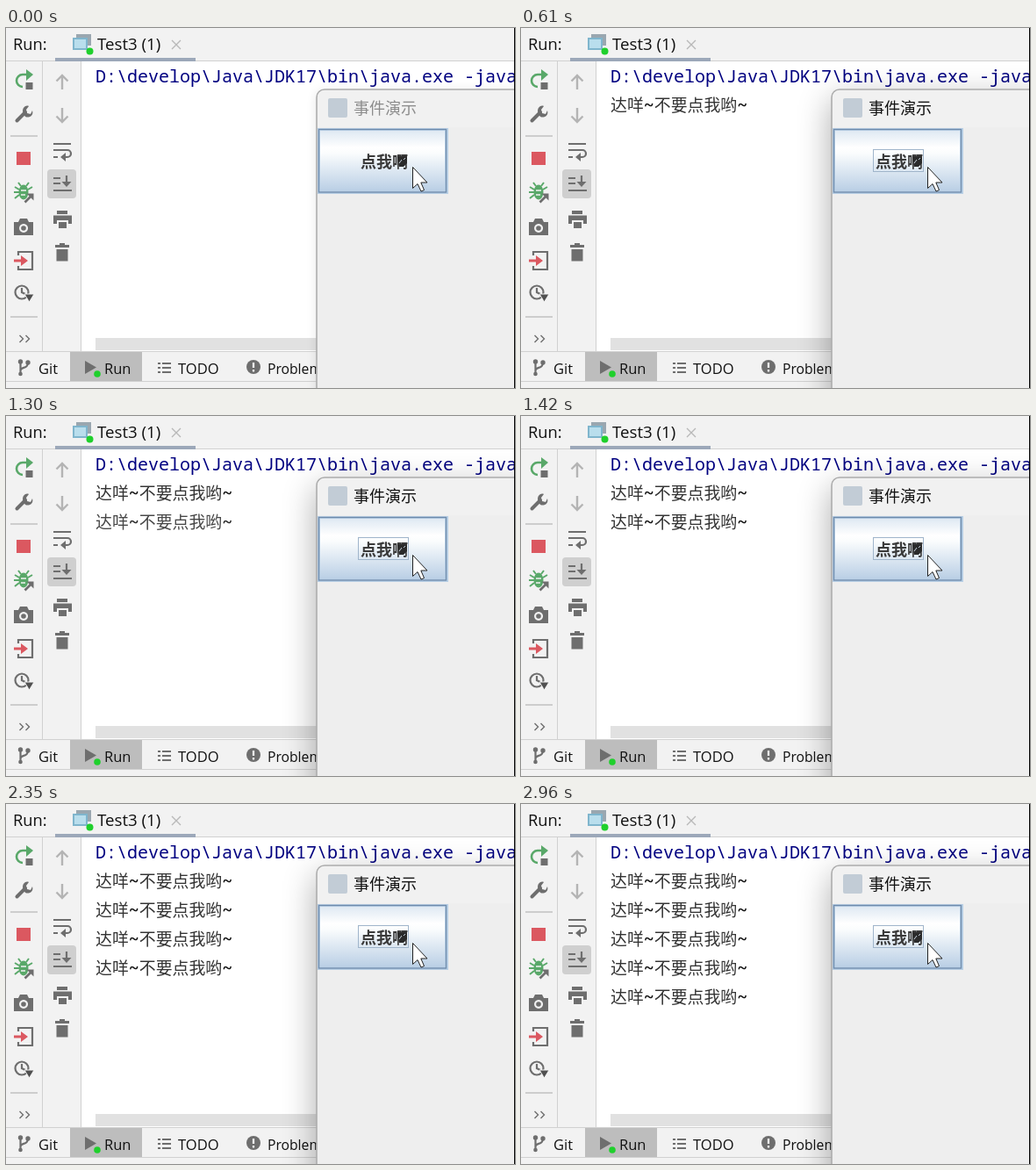
These frames come from a looping animation (580 px wide and 410 px high, 3 s). An HTML page:

```html
<!DOCTYPE html>
<html lang="zh-CN">
<head>
<meta charset="utf-8">
<title>Button event demo</title>
<style>
  html, body { margin: 0; width: 100%; height: 100%; overflow: hidden; background: #f2f2f2; }
  svg { display: block; }
  text { white-space: pre; }
  .ui { font-family: "Open Sans", "Noto Sans", sans-serif; fill: #111; }
  .mono { font-family: "Noto Sans Mono", "DejaVu Sans Mono", monospace; font-size: 20px; }
  .tilde { font-weight: 700; fill: #111; }
  .cjk { font-family: "Noto Sans CJK SC", "Noto Sans CJK", sans-serif; }
  .line { fill: none; stroke: #6e6e6e; stroke-width: 2.2; }
  .thin { stroke-width: 1.4; }
  .gray { fill: #6e6e6e; }
  .green { fill: #59a869; }
  .rule { fill: none; stroke: #d1d1d1; }
</style>
</head>
<body>
<svg width="580" height="410" viewBox="0 0 580 410">
  <defs>
    <linearGradient id="metal" x2="0" y2="1">
      <stop offset="0" stop-color="#dfe9f3"/>
      <stop offset=".28" stop-color="#fff"/>
      <stop offset=".38" stop-color="#fafcfd"/>
      <stop offset="1" stop-color="#bacfe5"/>
    </linearGradient>
    <filter id="soft" x="-40%" y="-40%" width="180%" height="180%"><feGaussianBlur stdDeviation="7"/></filter>
    <filter id="wide" x="-40%" y="-40%" width="180%" height="180%"><feGaussianBlur stdDeviation="19"/></filter>
  </defs>

  <!-- IDE panels -->
  <rect width="580" height="410" fill="#f2f2f2"/>
  <rect x="86" y="38" width="494" height="330" fill="#fff"/>
  <rect x="102" y="353" width="478" height="14" fill="#e1e1e1"/>
  <rect x="73" y="369" width="82" height="33" fill="#bdbdbd"/>
  <path class="rule" d="M0 37.5H580M0 368.5H580M0 402.5H580M41.5 38V368M85.5 38V368"/>
  <path d="M5 123H36M5 329H36" stroke="#cdcdcd" stroke-width="2"/>

  <!-- Run tab -->
  <rect x="56" y="34" width="160" height="4" fill="#9ca8b9"/>
  <text class="ui" x="8" y="25" font-size="18.3">Run:</text>
  <text class="ui" x="104" y="25" font-size="18.7">Test3 (1)</text>
  <path d="M189 14l10 10M199 14l-10 10" stroke="#b8b8b8" stroke-width="1.4"/>
  <path d="M80 7H97V20H93V11H80Z" fill="#9aa7b0"/>
  <rect x="77" y="12" width="15" height="12" fill="#b9deed" stroke="#7fb5cd" stroke-width="2"/>
  <circle cx="95.5" cy="26.5" r="4" fill="#1fd02c"/>

  <!-- first tool column -->
  <path d="M24 53H19a7 7 0 0 0 0 14" fill="none" stroke="#59a869" stroke-width="2.6"/>
  <path class="green" d="M23 47l8 6-8 7z"/>
  <rect class="gray" x="22.500" y="62" width="8" height="8"/>
  <path d="M12.500 105.500L22 96" stroke="#6e6e6e" stroke-width="4" stroke-linecap="round"/>
  <path class="gray" d="M20 98c-3-6 2-11 6-9l-3 4 1 4 4 1 2-4c2 6-4 9-8 7z"/>
  <rect x="12" y="141" width="16" height="15" fill="#db5860"/>
  <path d="M10 181l5 3M9 187h6M10 194l5-4M14 176l3 4M26 176l-3 4M30 181l-5 3" stroke="#59a869" stroke-width="2"/>
  <ellipse class="green" cx="20" cy="187" rx="5.500" ry="8.500"/>
  <path d="M17 185h6M17 190h5" stroke="#f2f2f2" stroke-width="1.500"/>
  <path d="M21.500 198.500l8-8" stroke="#6e6e6e" stroke-width="2.600"/>
  <path class="gray" d="M23.500 188.500h8v8z"/>
  <path class="gray" fill-rule="evenodd" d="M9 221h5l2-4h8l2 4h5v15H9zM20 223a5 5 0 1 0 .1 0z"/>
  <circle class="gray" cx="20" cy="228" r="2.800"/>
  <path class="line" d="M14 259V255H30V275H14V271"/>
  <path d="M9 263.500h8v-4.500l8 6-8 6v-4.500H9z" fill="#db5860"/>
  <circle class="line" cx="18" cy="301" r="7.500"/>
  <path class="line" d="M18 296v5l4 2"/>
  <path d="M21 303h11l-5.500 9z" fill="#505050" stroke="#f2f2f2"/>
  <path class="line thin" d="M15.500 350l4 4-4 4M22.500 350l4 4-4 4"/>

  <!-- second tool column -->
  <path id="arrow" d="M64 70V54M57.500 60.500L64 54l6.500 6.500" fill="none" stroke="#b4b4b4" stroke-width="2.400"/>
  <use href="#arrow" transform="matrix(1 0 0 -1 0 161)"/>
  <path class="line" d="M54 132H74M54 139H70a4 4 0 0 1 0 8H65M54 147H59"/>
  <path class="gray" d="M68 142v10l-6-5z"/>
  <rect x="47" y="161" width="33" height="33" rx="4" fill="#cfcfcf"/>
  <path class="line" d="M54 171H62M54 177H62M54 185H75M69 168V179"/>
  <path class="gray" d="M63.500 175h11l-5.500 6z"/>
  <path class="gray" d="M58 208H70V212H58zM54 213.500H75V223H71V219H58V223H54z"/>
  <rect class="gray" x="60" y="221" width="9" height="7"/>
  <path class="gray" d="M56 247h5v-2h6v2h5v3H56zM57.500 252h13v13.500h-13z"/>

  <!-- bottom bar -->
  <g class="ui" font-size="16.500">
    <text x="37" y="394">Git</text>
    <text x="112" y="394">Run</text>
    <text x="196" y="394">TODO</text>
    <text x="298" y="394" font-size="15.700">Problems</text>
  </g>
  <path class="line" d="M16.500 378V396M16.500 390C17 385 25 389 25 381"/>
  <g class="gray">
    <circle cx="16.500" cy="380" r="2.700"/><circle cx="25" cy="381" r="2.700"/><circle cx="16.500" cy="394" r="2.300"/>
    <path d="M90 379l13 7.500-13 7.500z"/>
    <circle cx="282" cy="386" r="8"/>
  </g>
  <circle cx="104" cy="394" r="3.800" fill="#1fd02c"/>
  <path class="line" d="M173 382h3M178 382h10M173 387h3M178 387h10M173 392h3M178 392h10"/>
  <path d="M282 381v6M282 389v2.500" stroke="#fff" stroke-width="2.200"/>

  <!-- console -->
  <text class="mono" x="102" y="62" fill="#000080">D:\develop\Java\JDK17\bin\java.exe -java</text>
  <g id="output" fill="#333"></g>

  <!-- Swing window -->
  <rect id="restShadow" x="356" y="74" width="260" height="400" filter="url(#soft)" opacity=".16"/>
  <rect id="focusShadow" x="354" y="82" width="260" height="400" filter="url(#wide)" opacity=".34"/>
  <rect x="354" y="70" width="250" height="360" rx="9" fill="#eee" stroke="#adadad" stroke-width="1.600"/>
  <path d="M355 113V79a8 8 0 0 1 8-8H580V113z" fill="#f1f1f1"/>
  <rect x="367" y="80" width="22" height="22" rx="2" fill="#c2ccd6"/>
  <text id="title" class="cjk" x="396" y="98" font-size="18">事件演示</text>

  <g id="raised">
    <rect x="355" y="114" width="149" height="75" fill="#b8cfe5"/>
    <rect x="356.500" y="115.500" width="145" height="71.500" fill="#b8cfe5" stroke="#6f8bab" stroke-width="1.300"/>
    <rect x="358" y="117" width="142" height="68.500" fill="url(#metal)"/>
  </g>
  <rect id="sunken" x="356" y="115" width="147" height="73" fill="#b8cde3" stroke="#758ca6" stroke-width="2"/>
  <rect id="focusRing" x="401.500" y="138.500" width="57" height="25" fill="none" stroke="#a0b5cb"/>
  <text class="cjk" x="404" y="159" font-size="18" font-weight="700" fill="#3a3a3a">点我啊</text>
  <path d="M446 146h11v8l-4 4h-5z" fill="#2b2b2b"/>
  <path d="M448 154l3-4M453 150l2-2" stroke="#c8d3df"/>
  <path d="M463.500 158.500v24l5.500-5 4 8.500 3.500-1.500-3.700-8.500h7.200z" fill="#fff" stroke="#222"/>
  <path d="M579.500 0V410" stroke="#000"/>
</svg>

<script>
const LOOP = 3000, HOLD = 120;
const clicks = [
  { press: 240, print: 530 },
  { press: 930, print: 1260 },
  { press: 1460, print: 1620 },
  { press: 1910, print: 2270 },
  { press: 2590, print: 2880 }
];
const byId = id => document.getElementById(id);
const show = (id, on) => byId(id).setAttribute("visibility", on ? "visible" : "hidden");

const tilde = '<tspan class="mono tilde">~</tspan>';
const han = text => `<tspan class="cjk" font-size="18.9" font-weight="300">${text}</tspan>`;
byId("output").innerHTML = clicks.map((_, i) =>
  `<text x="102" y="${95 + 33 * i}">${han("达咩")}${tilde}${han("不要点我哟")}${tilde}</text>`).join("");
const lines = [...byId("output").children];

// Each printed line settles in over three 40 ms steps.
const settle = age => age < 0 ? 0 : age < 40 ? .65 : age < 80 ? .9 : 1;

function draw(t) {
  const active = t >= clicks[0].press;
  const pressed = clicks.some(c => t >= c.press && t < c.press + HOLD);
  show("raised", !pressed);
  show("sunken", pressed);
  show("focusRing", active);
  show("restShadow", !active);
  show("focusShadow", active);
  byId("title").setAttribute("fill", active ? "#111" : "#8c8c8c");
  lines.forEach((line, i) => line.setAttribute("opacity", settle(t - clicks[i].print)));
}

const start = performance.now();
function tick() {
  draw((performance.now() - start) % LOOP);
  requestAnimationFrame(tick);
}
draw(0);
requestAnimationFrame(tick);
</script>
</body>
</html>
```
